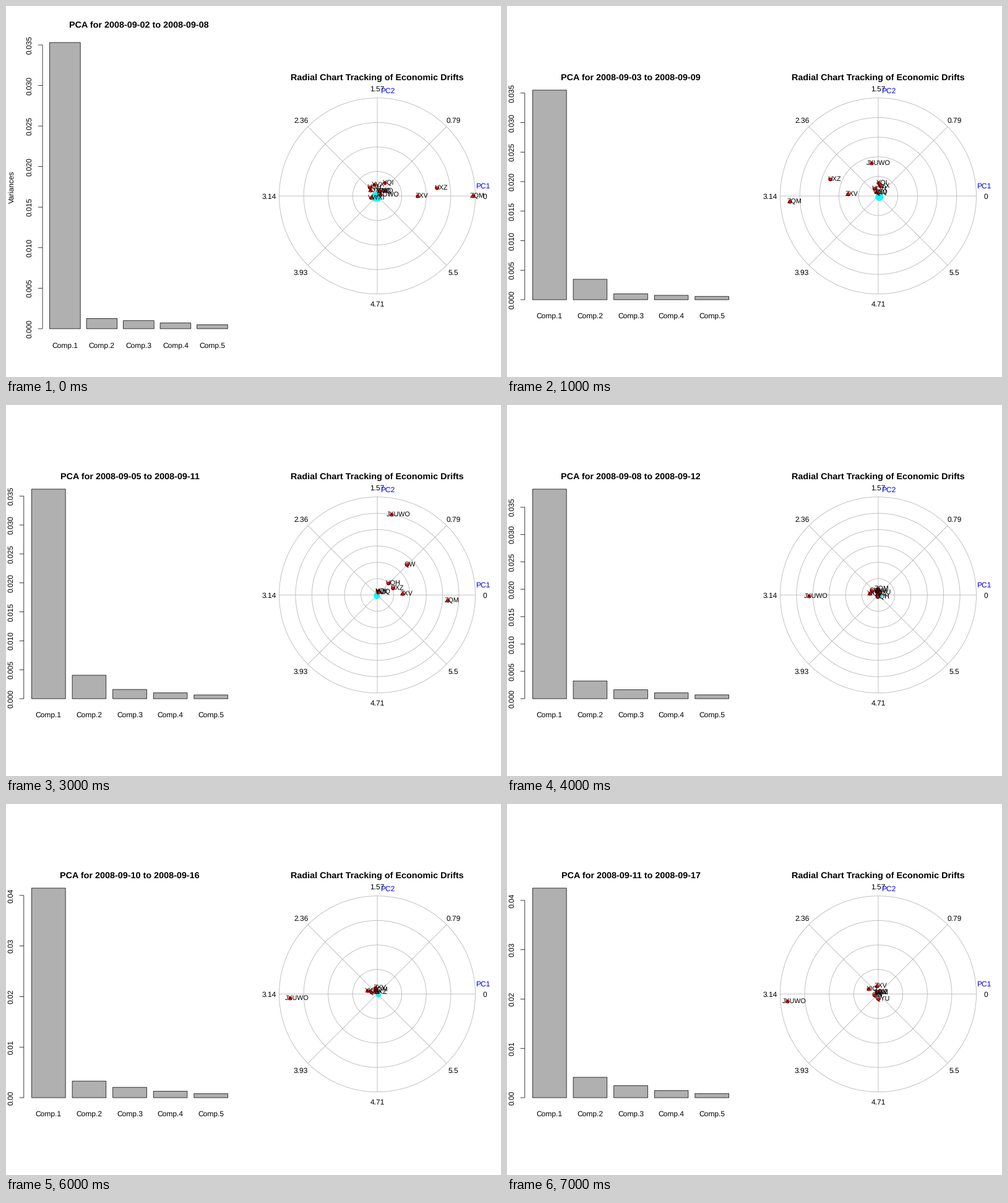
Animation of 800x600 px, one loop 8 s. Source, as a matplotlib script:

```python
import numpy as np
import matplotlib.pyplot as plt
from matplotlib.animation import ArtistAnimation
from matplotlib.patches import Circle, Rectangle

W, H, DPI = 800, 600, 100
PX = 72 / DPI            # points per pixel
LW = 0.75 * PX
ROW = 14.4               # height of one margin line
GRAY = "#b0b0b0"
CX, CY, R = 600, 307.2, 158.5
STEPS = 8
NEAR = 0.02              # points closer than this carry no label

plt.rcParams["font.family"] = "Liberation Sans"
plt.rcParams["text.hinting"] = "none"

fig = plt.figure(figsize=(W / DPI, H / DPI), dpi=DPI, facecolor="white")
ax = fig.add_axes([0, 0, 1, 1])
ax.set_xlim(0, W)
ax.set_ylim(H, 0)
ax.axis("off")


def text(x, y, s, size=12, **kw):
    """Text on a baseline, size in pixels."""
    kw = {"ha": "center", "va": "baseline", "rotation_mode": "anchor", "zorder": 5, **kw}
    return ax.text(x, y, s, fontsize=size * PX, **kw)


def line(xs, ys, color="black", z=2):
    return ax.plot(xs, ys, color=color, lw=LW, zorder=z, snap=False, solid_capstyle="butt")[0]


def dots(xs, ys, color, z):
    return ax.plot(xs, ys, "o", color=color, ms=6.2 * PX, mew=0, zorder=z)[0]


def ring(r):
    return ax.add_patch(Circle((CX, CY), r, fill=False, ec=GRAY, lw=LW, zorder=1))


def follow(keys, i):
    """Value at step i on a path through {step: value}."""
    return np.interp(i, list(keys), list(keys.values()))


# Variances in thousandths: two leading components and the head of the tail
LEAD = {0: 35.3, 1: 35.5, 2: 36.2, 3: 36.2, 5: 40.4, 7: 42.5}
SECOND = {0: 1.26, 1: 3.46, 2: 3.42, 3: 4.06, 5: 2.44, 7: 4.14}
THIRD = {0: 1.0, 1: 1.0, 3: 1.6, 5: 1.67, 7: 2.45}

# Loadings PC1 + PC2 j, up to the regime change and after it
BEFORE = {
    "ZQM": {0: .78 + 0j, 1: .9 - .058j, 3: .86 - .067j},
    "ZXV": {0: .33 + 0j, 1: .31 + .02j},
    "UXZ": {0: .485 + .066j, 1: .49 + .17j, 2: .464 + .196j, 3: .19 + .083j},
    "JXUWO": {0: .025 + .013j, 1: .07 + .337j, 2: .063 + .308j, 3: .174 + .985j},
    "QW": {0: .02 + .04j, 1: .005 + .035j, 2: .12 + .31j, 3: .36 + .37j},
    "UQH": {0: -.063 + .073j, 1: .041 + .08j, 2: .05 + .085j, 3: .133 + .148j},
    "YQI": {0: .063 + .106j, 1: .133j, 2: .05j},
    "YVX": {0: -.025 + .09j, 1: -.016 + .104j, 2: .01 + .03j},
    "WJQ": {0: .02 + .04j},
    "XJX": {0: -.055 + .045j, 1: 0j},
    "XIQ": {0: .06 + .043j, 1: 0j},
    "VWXI": {0: -.05 - .012j, 1: 0j},
}
AFTER = {
    "JXUWO": {5: .85 - .01j, 7: .93 - .073j},
    "XIQ": {5: .107 + .02j, 7: .1 + .05j},
    "QW": {5: .08 + .054j, 7: .04 - .01j},
    "ZQM": {5: .01 + .08j, 7: .015 + .015j},
    "ZXV": {5: .02 + .05j, 7: .013 + .082j},
    "QYU": {5: -.016 + .035j, 7: -.05j},
    "UXZ": {5: .01 + .02j},
    "UQH": {5: .01 - .022j, 7: 0j},
    "QX": {5: 0j, 7: -.013 + .018j},
}
BREAK = 4
RINGS = [4, 5, 5, 6, 6, 4, 4, 4]
# each window's components come with an arbitrary sign
SIGN1 = [1, -1, -1, 1, -1, -1, -1, -1]
SIGN2 = [1, 1, -1, 1, 1, 1, 1, 1]

WORKDAYS = [d for d in range(2, 18) if d % 7 not in (6, 0)]


def bar_chart(i):
    # the first plot fills its half, later ones are square
    if i == 0:
        left, top, right, bottom, margin = 4.1 * ROW, 4.1 * ROW, 400 - 2.1 * ROW, H - 5.1 * ROW, 4.1
    else:
        left, top, right, bottom, margin = 2 * ROW, 136, 400 - 2 * ROW, 478.4, 3
    title = f"PCA for 2008-09-{WORKDAYS[i]:02d} to 2008-09-{WORKDAYS[i + 4]:02d}"
    art = [text((left + right) / 2, top - margin / 2 * ROW + 5.2, title, 14.4, weight="bold")]
    if i == 0:
        art.append(text(left - 3.2 * ROW, (top + bottom) / 2, "Variances", rotation=90))

    third, last = follow(THIRD, i), 0.5 + 0.05 * i
    values = [follow(LEAD, i), follow(SECOND, i), *np.geomspace(third, last, 3)]
    height = (bottom - top) / 1.01
    base, scale = top + height, height / values[0]
    unit = (right - left) / 6.264
    for k, v in enumerate(values):
        x = left + (0.232 + 1.2 * k) * unit
        art.append(ax.add_patch(Rectangle((x, base - v * scale), unit, v * scale,
                                          fc=GRAY, ec="black", lw=LW, zorder=2, snap=False)))
        art.append(text(x + unit / 2, bottom + 1.8 * ROW, f"Comp.{k + 1}"))

    gap, digits = (10, 2) if values[0] >= 40 else (5, 3)
    ticks = np.arange(0, values[0], gap)
    art.append(line([left] * 2, [base, base - ticks[-1] * scale]))
    for t in ticks:
        y = base - t * scale
        art.append(line([left - ROW / 2, left], [y, y]))
        art.append(text(left - 1.2 * ROW, y, f"{t / 1000:.{digits}f}", rotation=90))
    return art


def radial_points(i):
    n = RINGS[i]
    art = [ring(R * k / n) for k in range(1, n)]
    limit = n * (0.2 if i <= BREAK else 0.25)

    def place(z):
        return (CX + SIGN1[i] * np.real(z) / limit * R,
                CY - SIGN2[i] * np.imag(z) / limit * R)

    # the quiet names huddle ever closer to the centre
    rng = np.random.default_rng(i)
    spread = 0.028 - 0.004 * i
    quiet = spread * np.sqrt(rng.random(40)) * np.exp(2j * np.pi * rng.random(40))
    art.append(dots(*place(quiet - 0.009 - 0.006j), "#00ffff", 3))

    for name, keys in (BEFORE if i < BREAK else AFTER).items():
        z = follow(keys, i)
        if abs(z) < NEAR:
            continue
        x, y = place(z)
        art.append(dots([x], [y], "#ff0000", 4))
        label = text(x, y + 3, name, 10.8, ha="left", zorder=6)
        # a fifth of the label lies left of its dot
        width = label.get_window_extent(fig.canvas.get_renderer()).width
        label.set_x(x - 0.2 * width)
        art.append(label)
    return art


# fixed part of the radial chart
ring(R)
for k in range(8):
    a = k * np.pi / 4
    c, s = np.cos(a), -np.sin(a)
    line([CX, CX + R * c], [CY, CY + R * s], GRAY, 1)
    text(CX + 1.1 * R * c, CY + 1.1 * R * s + 4.8, f"{round(a, 2):g}")
text(CX, 119.6, "Radial Chart Tracking of Economic Drifts", 14.4, weight="bold")
text(771, 295.3, "PC1", color="blue")
text(617, 141.3, "PC2", color="blue")

scenes = [bar_chart(i) + radial_points(i) for i in range(STEPS)]
anim = ArtistAnimation(fig, scenes, interval=1000, repeat=True, repeat_delay=0)
plt.show()
```
